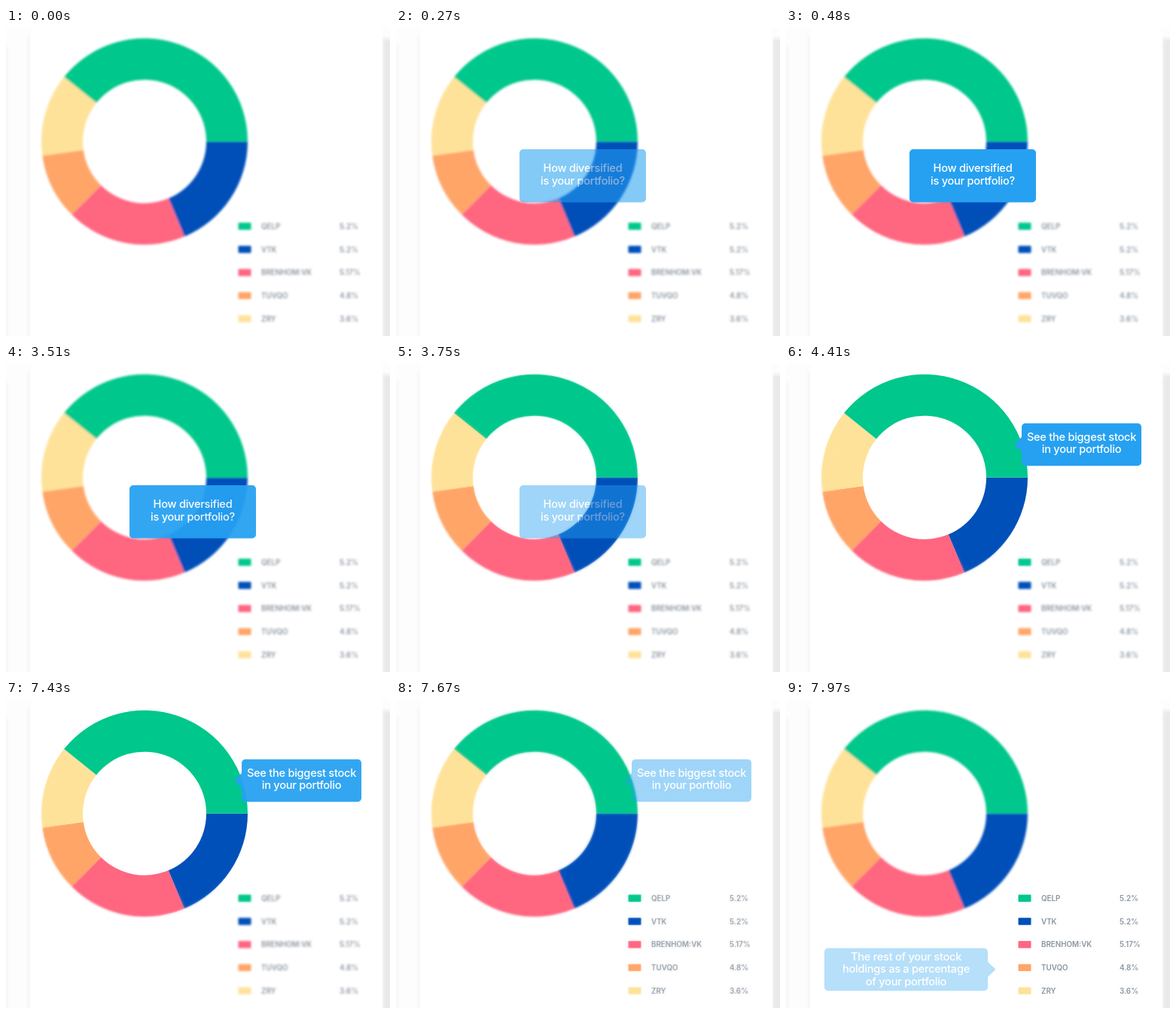
Recreate the animation shown at these times as an HTML page. Size 510 by 409 pixels, loop 8 s.

```html
<!DOCTYPE html>
<html lang="en">
<head>
<meta charset="utf-8">
<title>Portfolio diversification</title>
<style>
  html, body { margin: 0; width: 100%; height: 100%; overflow: hidden; background: #fdfdfd; }
  svg { display: block; width: 100%; height: 100%; }
  text { font-family: Inter, "Liberation Sans", sans-serif; }
  .legend { font-size: 9.8px; font-weight: 600; fill: #8a949f; }
  .tip path { fill: #26a1f2; }
  .tip text { font-size: 14.6px; font-weight: 500; letter-spacing: -.27px; fill: #fff; text-anchor: middle; }
</style>
</head>
<body>
<svg viewBox="0 0 510 409">
  <defs>
    <filter id="soften" filterUnits="userSpaceOnUse" x="0" y="0" width="510" height="420"><feGaussianBlur stdDeviation="1.8"/></filter>
    <filter id="shade" filterUnits="userSpaceOnUse" x="-20" y="-20" width="560" height="460"><feGaussianBlur stdDeviation="2.5"/></filter>
    <radialGradient id="spot" gradientUnits="userSpaceOnUse" cx="220" cy="90" r="215">
      <stop offset=".7" stop-color="#fff"/>
      <stop offset="1" stop-color="#000"/>
    </radialGradient>
    <mask id="ringMask" maskUnits="userSpaceOnUse" x="0" y="0" width="510" height="409">
      <rect width="510" height="409" fill="url(#spot)"/>
    </mask>
    <clipPath id="legendClip"><rect x="298" y="248" width="190" height="161"/></clipPath>
    <g id="chart"></g>
  </defs>
  <rect width="510" height="409" fill="#fdfdfd"/>
  <g filter="url(#shade)">
    <rect x="-4" y="24" width="7" height="400" fill="#f6f6f6"/>
    <rect x="29" y="10" width="6" height="410" fill="#f5f5f5"/>
    <rect x="500" y="14" width="20" height="410" fill="#e9e9e9"/>
  </g>
  <rect x="32" y="-2" width="468" height="430" rx="10" fill="#fff"/>
  <use href="#chart" filter="url(#soften)"/>
  <g id="sharpRing" mask="url(#ringMask)">
    <rect x="34" y="2" width="464" height="407" fill="#fff"/>
    <use href="#chart"/>
  </g>
  <g id="sharpLegend" clip-path="url(#legendClip)">
    <rect x="298" y="248" width="190" height="161" fill="#fff"/>
    <use href="#chart"/>
  </g>
  <g id="tips"></g>
</svg>
<script>
const LOOP = 8000, STEP = 30, FADE = 480;
const FIRST_EXIT = 3480, SECOND_EXIT = 7400;
const $ = id => document.getElementById(id);

function add(parent, tag, attrs, text = '') {
  const node = document.createElementNS('http://www.w3.org/2000/svg', tag);
  for (const key in attrs) node.setAttribute(key, attrs[key]);
  node.textContent = text;
  return parent.appendChild(node);
}

// Clockwise from the right: colour, end angle in degrees, ticker, share
const slices = [
  ['#0050b9', 67.3],
  ['#ff6680', 134.9],
  ['#ffa568', 172.1],
  ['#ffe299', 218.7],
  ['#00c78c', 360]
];
const holdings = [
  ['#00c78c', 'QELP', '5.2%'],
  ['#0050b9', 'VTK', '5.2%'],
  ['#ff6680', 'BRENHOM:VK', '5.17%'],
  ['#ffa568', 'TUVQO', '4.8%'],
  ['#ffe299', 'ZRY', '3.6%']
];

function ringSlice(from, to) {
  const point = (r, deg) => {
    const a = deg * Math.PI / 180;
    return `${184 + r * Math.cos(a)} ${150.7 + r * Math.sin(a)}`;
  };
  const large = to - from > 180 ? 1 : 0;
  return `M${point(137, from)}A137 137 0 ${large} 1 ${point(137, to)}` +
    `L${point(82, to)}A82 82 0 ${large} 0 ${point(82, from)}Z`;
}

let angle = 0;
for (const [fill, end] of slices) {
  add($('chart'), 'path', { d: ringSlice(angle, end), fill });
  angle = end;
}
holdings.forEach(([fill, ticker, share], i) => {
  const y = 263.3 + i * 30.7;
  add($('chart'), 'rect', { x: 308.5, y: y - 4.7, width: 17, height: 9.4, rx: 1, fill });
  add($('chart'), 'text', { x: 339, y: y + 3.6, class: 'legend' }, ticker);
  add($('chart'), 'text', { x: 443, y: y + 3.6, class: 'legend' }, share);
});

// arrow: -1 points left, 1 points right, 0 has none
function makeTip(x, y, w, h, arrow, baseline, lines) {
  const group = add($('tips'), 'g', { class: 'tip' });
  const mid = y + h / 2, r = 5;
  const right = arrow > 0 ? `V${mid - 10}l10.5 10l-10.5 10` : '';
  const left = arrow < 0 ? `V${mid + 10}l-10 -10l10 -10` : '';
  add(group, 'path', {
    d: `M${x + r} ${y}h${w - 2 * r}a${r} ${r} 0 0 1 ${r} ${r}${right}V${y + h - r}` +
      `a${r} ${r} 0 0 1 ${-r} ${r}h${2 * r - w}a${r} ${r} 0 0 1 ${-r} ${-r}${left}V${y + r}` +
      `a${r} ${r} 0 0 1 ${r} ${-r}Z`
  });
  lines.forEach((line, i) =>
    add(group, 'text', { x: x + w / 2, y: baseline + i * 16.4 }, line));
  return group;
}

const question = makeTip(164, 161, 168, 70.5, 0, 191.3, ['How diversified', 'is your portfolio?']);
const biggest = makeTip(313, 78.7, 159, 56.6, -1, 102, ['See the biggest stock', 'in your portfolio']);
const others = makeTip(51, 329.5, 217, 56.7, 1, 346,
  ['The rest of your stock', 'holdings as a percentage', 'of your portfolio']);

const ramp = (t, start, length = FADE) => Math.min(1, Math.max(0, (t - start) / length));
const focus = (t, exit) => 1 - (1 - ramp(t, exit + 60, 720)) ** 3;
const setOpacity = (node, value) => node.setAttribute('opacity', value);

function draw(time) {
  const base = time < SECOND_EXIT ? 0 : SECOND_EXIT;
  const t = base + Math.floor((time - base) / STEP) * STEP;
  setOpacity(question, ramp(t, 0) - ramp(t, FIRST_EXIT));
  setOpacity(biggest, ramp(t, 3930) - ramp(t, SECOND_EXIT));
  setOpacity(others, ramp(t, 7810));
  setOpacity($('sharpRing'), focus(t, FIRST_EXIT) - focus(t, SECOND_EXIT));
  setOpacity($('sharpLegend'), focus(t, SECOND_EXIT));
}

const began = performance.now();
function tick() {
  draw((performance.now() - began) % LOOP);
  requestAnimationFrame(tick);
}
tick();
</script>
</body>
</html>
```
